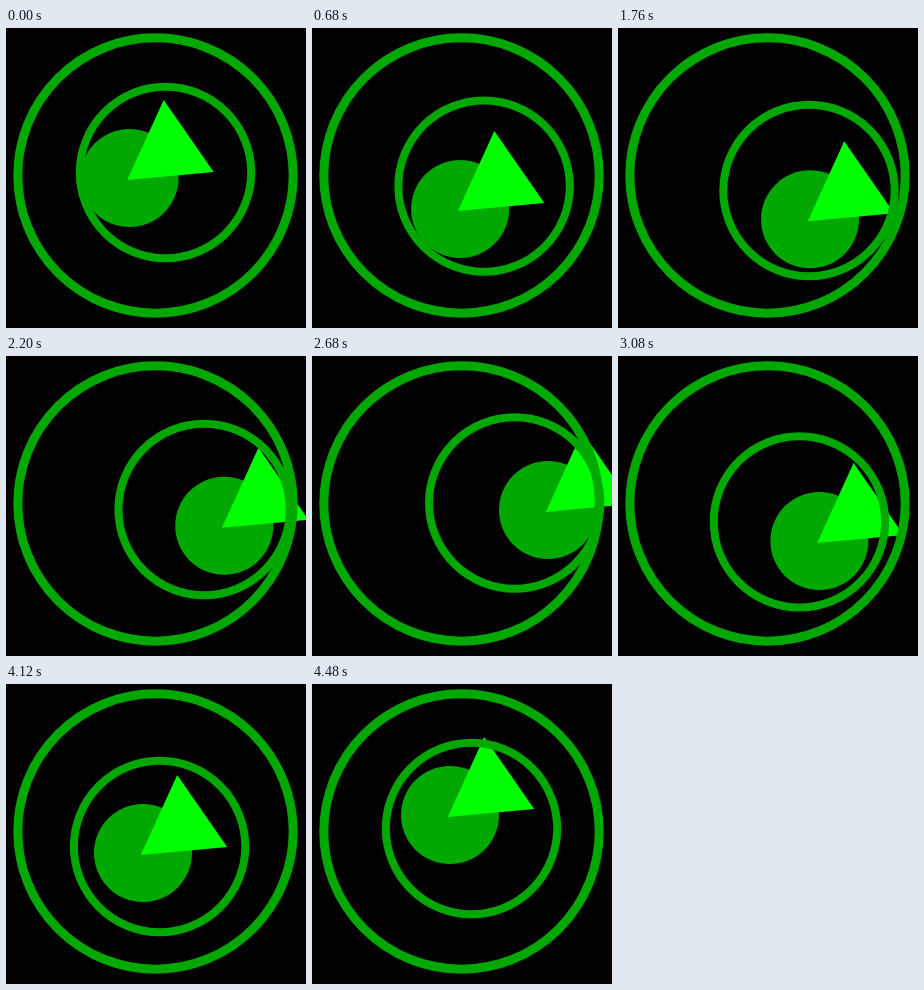
These frames come from a looping animation (300 by 300 pixels, 4520 ms). An HTML page with a canvas:

```html
<!DOCTYPE html>
<html>
<head>
<meta charset="utf-8">
<title>Circles</title>
<style>
html, body { margin: 0; width: 100%; height: 100%; overflow: hidden; background: #000; }
canvas { display: block; }
</style>
</head>
<body>
<canvas id="stage" width="300" height="300"></canvas>
<script>
const ctx = document.getElementById('stage').getContext('2d');
const STEP = 40, COUNT = 113;
const DARK = '#00a800', BRIGHT = '#00ff00';

// Key poses at the given steps
const times = [0, 34, 44, 67, 85, 92, 103, 112];
const ring = {
  x: [159.5, 184.5, 191, 202.7, 157, 148.5, 153.6, 159.5],
  y: [144.5, 166.3, 162.5, 147, 186.5, 189.3, 162.5, 144.5]
};
const disc = {
  x: [123.5, 173.5, 192, 236, 160, 138, 137, 138],
  y: [150, 199.5, 191.3, 154, 219, 224, 169, 131]
};

// Tangent at a key: flat where the motion turns back
function slope(values, i) {
  const a = Math.max(i - 1, 0), b = Math.min(i + 1, times.length - 1);
  const turns = (values[i] - values[a]) * (values[b] - values[i]) < 0;
  return turns ? 0 : (values[b] - values[a]) / (times[b] - times[a]);
}

function valueAt(values, t) {
  const i = times.findLastIndex((key, k) => key <= t && k < times.length - 1);
  const h = times[i + 1] - times[i];
  const u = (t - times[i]) / h, v = 1 - u;
  return v * v * (1 + 2 * u) * values[i] + u * u * (3 - 2 * u) * values[i + 1]
    + u * v * h * (v * slope(values, i) - u * slope(values, i + 1));
}

const place = (part, t) => [valueAt(part.x, t), valueAt(part.y, t)];

function circle(x, y, r, width) {
  ctx.beginPath();
  ctx.arc(x, y, r, 0, 2 * Math.PI);
  if (width) {
    ctx.lineWidth = width;
    ctx.strokeStyle = DARK;
    ctx.stroke();
  } else {
    ctx.fillStyle = DARK;
    ctx.fill();
  }
}

function triangle(x, y) {
  ctx.beginPath();
  ctx.moveTo(x + 34.2, y - 78);
  ctx.lineTo(x + 84.2, y - 6);
  ctx.lineTo(x - 2.3, y + 2);
  ctx.fillStyle = BRIGHT;
  ctx.fill();
}

function draw(now) {
  const t = Math.floor(now / STEP) % COUNT;
  const discAt = place(disc, t);
  ctx.fillStyle = '#000';
  ctx.fillRect(0, 0, 300, 300);
  circle(...discAt, 49);
  triangle(...discAt);
  circle(...place(ring, t), 85.7, 8);
  circle(149.5, 147.5, 137.7, 9);
}

let start;
function tick(now) {
  start ??= now;
  draw(now - start);
  requestAnimationFrame(tick);
}
draw(0);
requestAnimationFrame(tick);
</script>
</body>
</html>
```
